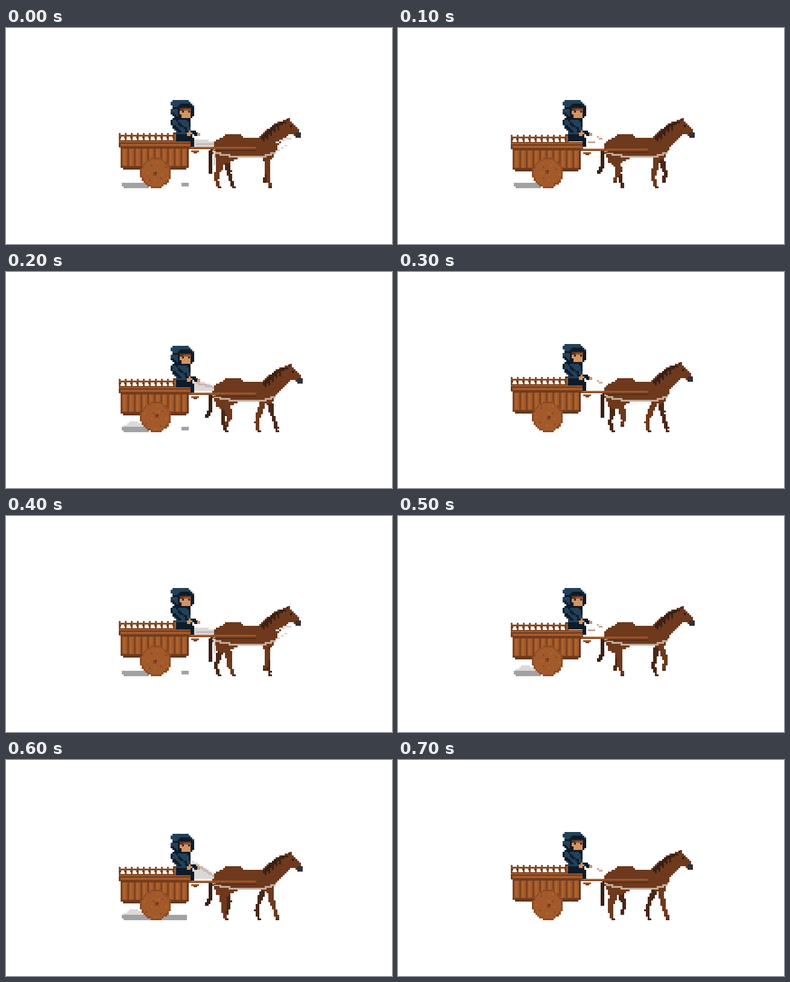
Animation, 640 px wide and 360 px high, one loop 0.8 s. Source, as an HTML page with a canvas:

```html
<!DOCTYPE html>
<html lang="en">
<head>
<meta charset="utf-8">
<title>Horse cart</title>
<style>
html, body { margin: 0; width: 100%; height: 100%; overflow: hidden; background: #fff; }
canvas { display: block; }
</style>
</head>
<body>
<canvas id="stage" width="640" height="360"></canvas>
<script>
const ctx = document.getElementById('stage').getContext('2d');
const CELL = 3, STEP = 100, STEPS = 8;
const snap = v => Math.round(v / CELL) * CELL;
const mix = (a, b, t) => a + (b - a) * t;
const WOOD = '#a35a2b', WOOD_DARK = '#713b1b', WOOD_LIGHT = '#b0672f';
const COAT = '#6e391d', COAT_DARK = '#3b2015', STRAP = '#c7ab98';
const BLUE = '#234159', NAVY = '#0f1b29', SKIN = '#d6945f', GREY = '#a2a2a3', VEIL = '#dcd8d8';

function rect(color, x, y, w, h) {
  ctx.fillStyle = color;
  ctx.fillRect(x, y, w, h);
}

// Scanline fill with edges on the cell grid
function poly(color, pts, dx = 0, dy = 0) {
  for (let y = 90; y < 300; y += CELL) {
    const row = y + CELL / 2 - dy, hits = [];
    for (let i = 0; i < pts.length; i += 2) {
      const j = (i + 2) % pts.length;
      const [x0, y0, x1, y1] = [pts[i], pts[i + 1], pts[j], pts[j + 1]];
      if ((y0 <= row) !== (y1 <= row)) hits.push(mix(x0, x1, (row - y0) / (y1 - y0)));
    }
    hits.sort((a, b) => a - b);
    for (let i = 0; i + 1 < hits.length; i += 2) {
      const a = snap(hits[i] + dx), b = snap(hits[i + 1] + dx);
      rect(color, a, y, Math.max(CELL, b - a), CELL);
    }
  }
}

// Stroke of stamped cells that tapers from w0 to w1
function limb(color, w0, w1, pts, dx = 0, dy = 0) {
  const segs = pts.length / 2 - 1;
  for (let s = 0; s < segs; s++) {
    const [x0, y0, x1, y1] = pts.slice(s * 2, s * 2 + 4);
    const n = Math.ceil(Math.hypot(x1 - x0, y1 - y0));
    for (let i = 0; i <= n; i++) {
      const t = i / n, w = Math.max(CELL, snap(mix(w0, w1, (s + t) / segs)));
      rect(color, snap(mix(x0, x1, t) + dx - w / 2), snap(mix(y0, y1, t) + dy - CELL / 2), w, CELL);
    }
  }
}

// The foot glides back on the ground for `stance` steps, then swings forward
function leg(color, width, centre, reach, stance, step) {
  const k = step % STEPS, swing = k > stance;
  const s = swing ? (k - stance) / (STEPS - stance) : k / stance;
  const foot = centre + reach * (swing ? 2 * s - 1 : Math.cos(Math.PI * s));
  const lift = swing ? 9 : 0;
  const hip = centre + 0.3 * (foot - centre) - 1;
  const fetlock = foot + (swing ? 5 : -4);
  const knee = (hip + fetlock) / 2 + (swing ? 3 : -1);
  limb(color, width, 4, [hip, 214, knee, 234, fetlock, 250 - lift / 2, foot, 265 - lift]);
  rect('#4b2a1c', snap(foot - 2), snap(263 - lift), 6, 3);
}

function shadow(slot, pose) {
  if (pose === 3) return;
  if (slot > 1 && slot !== 4) poly(VEIL, [192, 258, 206, 250, 218, 250, 235, 258]);
  const end = slot === 6 ? 302 : 240;
  poly(GREY, [193, 257, end - 3, 257, end, 261, end - 4, 267, 195, 267, 190, 262]);
  if (pose % 2 === 0 && slot !== 6) poly(GREY, [292, 257, 301, 257, 303, 261, 299, 265, 293, 265, 289, 261]);
}

function reins(slot, pose) {
  if (pose % 2) {
    limb(STRAP, 3, 3, [330, 182, 336, 184]);
    if (pose === 1) limb(STRAP, 3, 3, [316, 190, 324, 191]);
    return;
  }
  const top = slot === 6 ? 168 : pose ? 179 : 186;
  poly(VEIL, [310, top, 324, (top + 186) / 2, 345, 189, 346, 197, 309, 199]);
  limb('#c8b9b3', 3, 3, [316, top + 6, 342, 192]);
}

function horse(slot, pose, lag) {
  const dx = lag, dy = pose === 2 ? 3 : 0;
  limb(COAT_DARK, 8, 5, [344, 201, 339, 214, 339, 230, lag ? 333 : 340, 241]);
  leg('#4a2717', 10, 364, 12, 4, slot);
  leg('#4a2717', 9, 433, 17, 5, slot + 6);
  leg(COAT, 14, 364, 12, 4, slot + 4);
  leg(COAT, 11, 433, 17, 5, slot + 2);

  poly(COAT, [341, 192, 355, 184, 366, 177, 386, 177, 396, 183, 448, 183, 449, 202,
    442, 217, 434, 221, 421, 216, 386, 217, 374, 222, 360, 228, 350, 226, 343, 209]);
  poly(COAT, [419, 184, 428, 174, 440, 164, 451, 156, 465, 153, 468, 150, 471, 156, 480, 163,
    487, 172, 487, 179, 481, 182, 475, 177, 467, 179, 458, 188, 449, 198, 430, 202], dx, dy);
  limb(COAT_DARK, 7, 5, [426, 183, 440, 168, 452, 160, 463, 156], dx, dy);
  for (let i = 0; i < 5; i++) rect(COAT_DARK, snap(427 + i * 6 + dx), snap(184 - i * 5 + dy), 3, 6);
  rect('#482519', 465 + dx, 151 + dy, 3, 4);
  rect('#21130f', 471 + dx, 162 + dy, 3, 3);
  poly('#303239', [481, 174, 490, 174, 490, 181, 486, 183, 480, 182], dx, dy);

  limb(STRAP, 3, 3, [344, 206, 358, 211, 378, 214, 428, 214, 446, 208]);
  if (pose === 0) {
    rect('#d8d1cd', 344, 202, 3, 27);
    limb('#ded9d6', 3, 3, [449, 191, 459, 186, 472, 183]);
    for (let i = 0; i < 3; i++) rect('#d2c7c0', 450 + i * 6, 203 - i * 4, 4, 2);
  }
}

function cart(dy) {
  ctx.save();
  ctx.translate(0, dy);
  rect('#8b4a23', 187, 178, 96, 3);
  for (let x = 187; x < 283; x += 10) {
    rect('#87502d', x, 175, 3, 13);
    rect(WOOD_DARK, x - (x > 187 ? 1 : 0), 181, 4, 3);
  }
  rect(WOOD_DARK, 277, 174, 6, 14);
  rect(WOOD, 279, 177, 3, 10);

  rect(WOOD_DARK, 187, 187, 120, 12);
  rect('#9b552a', 187, 188, 120, 3);
  rect(WOOD, 190, 193, 117, 4);
  rect(WOOD, 190, 199, 113, 33);
  for (let x = 190; x < 300; x += 11) {
    rect('#7e421f', x, 199, 3, 33);
    rect(WOOD_LIGHT, x + 5, 202, 2, 27);
  }
  rect(WOOD_DARK, 190, 199, 113, 2);
  rect(WOOD_DARK, 190, 230, 113, 3);
  rect('#64351c', 194, 233, 105, 3);
  rect('#64351c', 300, 200, 3, 33);
  ctx.restore();
}

function wheel(pose) {
  const cx = 248, cy = 241.5;
  for (let y = 216; y < 267; y += CELL) for (let x = 222; x < 275; x += CELL) {
    const d = Math.hypot(x + 1.5 - cx, y + 1.5 - cy);
    if (d < 25.5) rect(d > 23 ? '#8c4c25' : WOOD, x, y, CELL, CELL);
  }
  for (let i = 0; i < 9; i++) {
    const a = i * 2.4 + pose * Math.PI / 2, r = 9 + i * 5 % 14;
    rect(i % 2 ? '#8a4a24' : WOOD_LIGHT, snap(cx + r * Math.cos(a)), snap(cy + r * Math.sin(a)), 3, 3);
  }
  const hubX = pose < 2 ? 244 : 247, hubY = pose % 3 ? 237 : 240;
  rect('#834521', hubX, hubY, 6, 6);
  rect('#673518', hubX + 3, hubY, 3, 3);
}

function shaft(dy) {
  rect('#8b4a22', 303, 198 + dy, 112, 4);
  rect(WOOD_LIGHT, 307, 198 + dy, 35, 2);
  rect('#a15825', 345, 198 + dy, 68, 2);
  rect('#54301c', 345, 203 + dy, 70, 2);
  rect('#95552b', 307, 204 + dy, 13, 3);
  rect(WOOD_DARK, 311, 207 + dy, 6, 2);
}

function rider(dy) {
  poly(NAVY, [277, 149, 304, 149, 307, 156, 307, 168, 304, 174, 312, 184, 313, 197,
    307, 197, 306, 188, 282, 188, 282, 174, 274, 162, 274, 153], 0, dy);
  poly(BLUE, [276, 152, 299, 152, 304, 158, 305, 171, 301, 178, 284, 177, 276, 160], 0, dy);
  limb(NAVY, 3, 3, [283, 153, 290, 162, 298, 168, 302, 176], 0, dy);
  limb(NAVY, 3, 3, [279, 164, 290, 173], 0, dy);

  poly(BLUE, [279, 120, 299, 120, 306, 123, 313, 134, 313, 147, 307, 150,
    285, 150, 273, 142, 273, 135, 276, 132, 273, 129, 273, 123], 0, dy);
  limb(NAVY, 3, 3, [276, 132, 283, 132], 0, dy);
  limb(NAVY, 3, 3, [275, 142, 280, 147, 288, 150], 0, dy);
  poly(NAVY, [289, 126, 304, 126, 313, 135, 313, 147, 307, 150, 288, 150, 284, 144, 285, 132], 0, dy);
  rect('#5a3526', 288, 133 + dy, 19, 5);
  rect('#915b3d', 294, 135 + dy, 12, 3);
  poly(SKIN, [287, 138, 307, 138, 307, 147, 304, 150, 291, 150, 291, 144, 287, 144], 0, dy);
  for (const x of [292, 302]) rect('#37221e', x, 138 + dy, 3, 3);

  poly(SKIN, [301, 173, 306, 170, 310, 173, 306, 179, 301, 180], 0, dy);
  limb(NAVY, 6, 6, [308, 171, 313, 176, 317, 179], 0, dy);
  rect(SKIN, 317, 175 + dy, 5, 5);
}

function draw(slot) {
  const pose = slot % 4;
  const lag = pose === 1 || pose === 2 ? CELL : 0;
  rect('#fff', 0, 0, 640, 360);
  shadow(slot, pose);
  horse(slot, pose, lag);
  reins(slot, pose);
  cart(lag);
  wheel(pose);
  shaft(lag);
  rider(pose === 2 ? CELL : 0);
}

function tick() {
  draw(Math.floor(performance.now() / STEP) % STEPS);
  requestAnimationFrame(tick);
}
tick();
</script>
</body>
</html>
```
